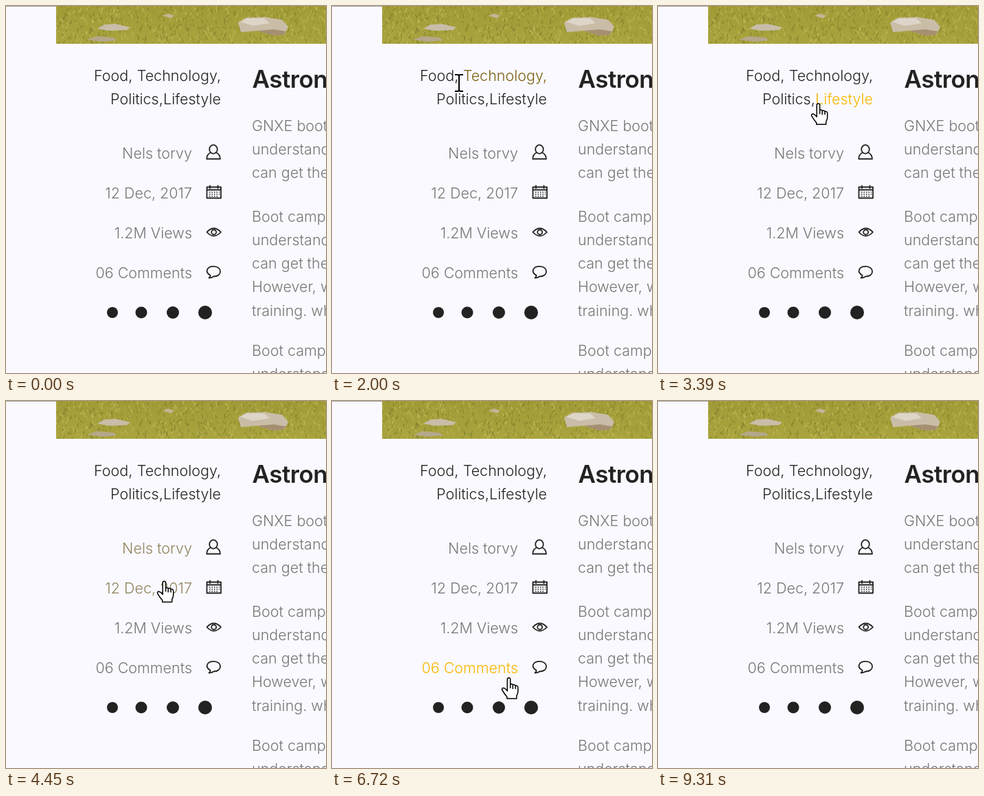
An HTML page that plays this animation: 466x534 px, repeating every 9.77 s.

```html
<!DOCTYPE html>
<html lang="en">
<head>
<meta charset="utf-8">
<style>
  html, body { margin: 0; width: 100%; height: 100%; overflow: hidden; background: #f9f9ff; }
  svg { display: block; width: 466px; height: 534px; }
  text { font: 300 21.5px Inter, "Open Sans", sans-serif; }
  .article { fill: #777; }
  .title { font-weight: 600; font-size: 35px; letter-spacing: -.5px; fill: #222; }
  .icon { fill: none; stroke: #222; stroke-width: 1.8; stroke-linejoin: round; stroke-linecap: round; }
</style>
</head>
<body>
<svg viewBox="0 0 466 534">
  <defs>
    <linearGradient id="meadow" x2="0" y2="1">
      <stop offset="0" stop-color="#a19b37"/>
      <stop offset="1" stop-color="#aaa43f"/>
    </linearGradient>
    <clipPath id="photo"><rect x="73" width="393" height="55"/></clipPath>
  </defs>
  <rect width="466" height="534" fill="#f9f9ff"/>
  <path d="M0 .5H73" stroke="#a5a5ab"/>

  <g clip-path="url(#photo)">
    <rect x="73" width="393" height="55" fill="url(#meadow)"/>
    <g id="grass" fill="none" stroke-width="1.4"></g>
    <path d="M133 33L143 27L160 26L181 31L176 35L150 36Z" fill="#c9bda9"/>
    <path d="M118 49L132 44L156 46L162 50L140 52Z" fill="#b5a78b"/>
    <path d="M228 14L236 11L245 14L240 18Z" fill="#c3b594"/>
    <path d="M338 24L350 17L377 16L402 20L411 30L406 41L390 43L366 36L342 38Z" fill="#cabda8"/>
    <path d="M341 23L351 18L376 18L384 25L360 29Z" fill="#ddd5c8"/>
    <path d="M366 36L390 34L408 37L404 42L389 43Z" fill="#a58f71"/>
  </g>

  <text class="title" x="358.5" y="119">Astronomy</text>
  <g id="article" class="article"></g>
  <g id="items"></g>

  <g class="icon">
    <ellipse cx="302" cy="208.5" rx="5.8" ry="6.3"/>
    <path d="M297.5 213.5Q292.5 216 292.3 222.5H312Q311.600 216 306.500 213.500"/>
    <path d="M292.500 263.500H313V279.500H292.500ZM292.500 267.500H313M297 261.500V265M308.500 261.500V265"/>
    <path d="M296 271H311M296 274H311M296 277H308" stroke-width="1.700" stroke-dasharray="1.500 2" stroke-linecap="butt"/>
    <path d="M292.500 329Q302.500 318 313 329Q302.500 340 292.500 329Z"/>
    <circle cx="302.700" cy="329" r="3.500"/>
    <path d="M295.500 395.500Q298 394 297.500 391.800C289 387 292.500 378.800 302.500 378.800C315 378.800 315.500 393.500 302.500 393.500Q299 395.800 295.500 395.500Z"/>
  </g>

  <g id="cursor" stroke-linejoin="round">
    <g id="hand" stroke="#000" stroke-width="1.500">
      <path fill="#fff" d="M-2 20V3Q-2 .7 .2 .7T2.400 3V10.500Q4.500 8.800 6 11.200Q8.300 9.800 9.800 12.200Q12.500 11.300 13.500 14.300V21Q13.300 24 11.500 27V31H-2.500V28.500Q-6 24.500 -9.500 18.500Q-10.300 16 -8 15.600Q-5.500 15.500 -2 20Z"/>
      <path fill="none" d="M2.400 10.500V16M6 11.200V17M9.800 12.200V17"/>
    </g>
    <g id="beam" fill="none">
      <path id="beamShape" d="M-6 -12H-2Q0 -12 0 -10Q0 -12 2 -12H6M0 -10V10M-6 12H-2Q0 12 0 10Q0 12 2 12H6" stroke="#000" stroke-width="2"/>
    </g>
    <path id="arrow" d="M0 0V24L5.500 19L9.500 28L13.500 26.200L9.600 17.500H17Z" fill="#fff" stroke="#000" stroke-width="1.300"/>
  </g>
</svg>

<script>
const LOOP = 9770, FPS = 15, FADE = 300;
const DARK = [34, 34, 34], GRAY = [119, 119, 119], ACCENT = [249, 183, 0];
const $ = id => document.getElementById(id);

function add(parent, tag, attrs, content = '') {
  const el = document.createElementNS('http://www.w3.org/2000/svg', tag);
  for (const key in attrs) el.setAttribute(key, attrs[key]);
  el.textContent = content;
  return parent.appendChild(el);
}

let seed = 17;
const random = () => (seed = seed * 16807 % 2147483647) / 2147483647;

for (const color of ['#858329', '#bdb54f', '#979530', '#cbc363', '#76792a']) {
  let d = '';
  for (let i = 0; i < 190; i++) {
    const x = 73 + random() * 393, y = random() * 58;
    d += `M${x.toFixed(1)} ${y.toFixed(1)}l${(random() * 6 - 3).toFixed(1)} ${(-2 - random() * 4).toFixed(1)}`;
  }
  add($('grass'), 'path', { d, stroke: color, opacity: .6 });
}

[
  [182, 'GNXE boot camps'], [216, 'understanding'], [250, 'can get the'],
  [314, 'Boot camps have'], [348, 'understanding'], [382, 'can get the'],
  [416, 'However, who'], [451, 'training. who'],
  [509, 'Boot camps have'], [543, 'understanding']
].forEach(([y, line]) => add($('article'), 'text', { x: 358, y }, line));

// Each item lights up between its hover start and end.
const label = (text, x, y, base, start, end, anchor = 'end') => ({
  base, start, end, el: add($('items'), 'text', { x, y, 'text-anchor': anchor }, text)
});
const badge = (cx, r, start, end) => ({
  base: DARK, start, end, el: add($('items'), 'circle', { cx, cy: 446, r })
});
const items = [
  label('Food,', 128, 109, DARK, 2050, 2500, 'start'),
  label('Technology,', 313, 109, DARK, 850, 1900),
  label('Politics,', 152, 143, DARK, 2560, 2990, 'start'),
  label('Lifestyle', 313, 143, DARK, 3080, 3700),
  label('Nels torvy', 271, 222, GRAY, 3860, 4320),
  label('12 Dec, 2017', 271, 280, GRAY, 4420, 5130),
  label('1.2M Views', 271, 338, GRAY, 5180, 5920),
  label('06 Comments', 271, 396, GRAY, 6050, 6800),
  badge(290, 10, 7420, 7990),
  badge(243, 9, 8080, 8250),
  badge(197, 8.5, 8340, 8480),
  badge(155, 8, 8570, 8770)
];

// Pointer path: time, x, y
const path = [
  [60, 413, 432], [400, 365, 310], [650, 310, 200], [870, 262, 118],
  [1200, 240, 112], [1600, 226, 110], [1850, 203, 110], [2000, 185, 112],
  [2250, 160, 107], [2450, 162, 114], [2650, 182, 140], [3000, 208, 143],
  [3390, 233, 141], [3650, 238, 148], [4030, 235, 216], [4310, 235, 216],
  [4450, 230, 261], [4900, 236, 276], [5260, 247, 319], [5450, 251, 337],
  [5850, 251, 337], [6100, 263, 378], [6380, 262, 387], [6690, 262, 387],
  [6720, 257, 401], [7050, 265, 425], [7450, 283, 446], [7870, 285, 449],
  [8150, 243, 449], [8400, 198, 449], [8620, 157, 450], [8750, 150, 452],
  [9000, 205, 482], [9300, 310, 534]
];

const clamp = v => Math.min(1, Math.max(0, v));

// The CSS "ease" curve, solved by bisection.
function ease(p) {
  let lo = 0, hi = 1;
  const bezier = (s, a, b) => 3 * s * (1 - s) ** 2 * a + 3 * s * s * (1 - s) * b + s ** 3;
  for (let i = 0; i < 16; i++) {
    const mid = (lo + hi) / 2;
    if (bezier(mid, .25, .25) < p) lo = mid; else hi = mid;
  }
  return bezier(lo, .1, 1);
}
const ramp = (t, from) => ease(clamp((t - from) / FADE));

function pointerAt(t) {
  const i = path.findIndex(p => p[0] >= t);
  if (i <= 0) return path[0].slice(1);
  const [t0, x0, y0] = path[i - 1], [t1, x1, y1] = path[i];
  const k = (t - t0) / (t1 - t0);
  return [x0 + (x1 - x0) * k, y0 + (y1 - y0) * k];
}

function render(t) {
  let hovering = false;
  for (const { el, base, start, end } of items) {
    const level = ramp(t, start) * (1 - ramp(t, end));
    const rgb = base.map((c, i) => Math.round(c + (ACCENT[i] - c) * level));
    el.setAttribute('fill', `rgb(${rgb})`);
    hovering ||= t >= start && t < end;
  }
  const visible = t > 60 && t < 9300;
  $('cursor').style.display = visible ? '' : 'none';
  if (!visible) return;
  const [x, y] = pointerAt(t);
  const kind = hovering ? 'hand' : x > 345 || y < 145 ? 'beam' : 'arrow';
  for (const id of ['hand', 'beam', 'arrow']) $(id).style.display = id === kind ? '' : 'none';
  $('cursor').setAttribute('transform', `translate(${x.toFixed(1)} ${y.toFixed(1)})`);
}

const startTime = performance.now();
function tick() {
  const t = (performance.now() - startTime) % LOOP;
  render(Math.floor((t + 25) * FPS / 1000) * 1000 / FPS);
  requestAnimationFrame(tick);
}
tick();
</script>
</body>
</html>
```
